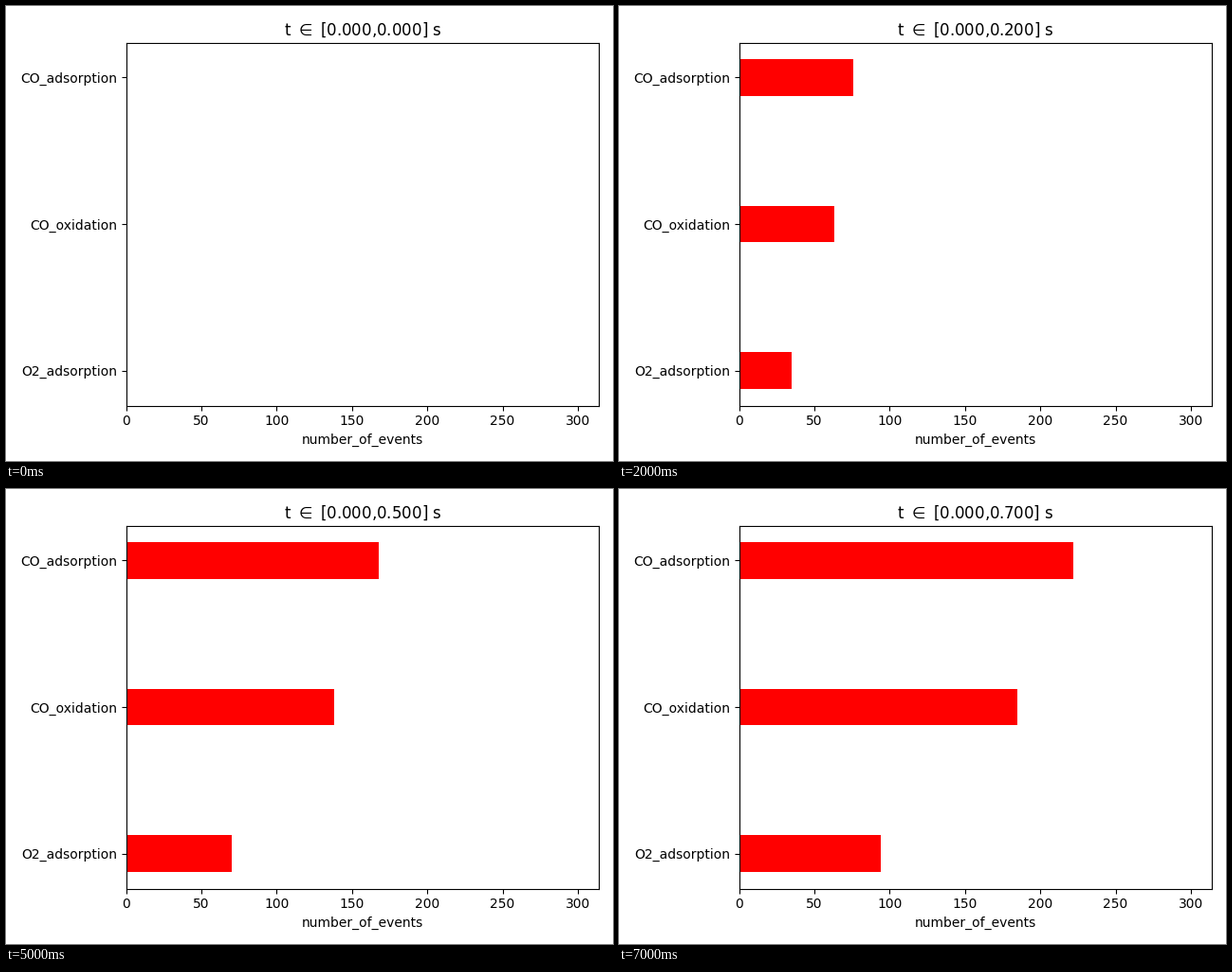
A matplotlib script for the animation above (8000 ms loop, 640 by 480 pixels).

```python
import matplotlib.pyplot as plt
import numpy as np
from matplotlib.animation import FuncAnimation

STEPS = 8
DARK_STEP = 1
MAX_COUNT = 299

# Event totals at a few key steps; they grow linearly in between
KEY_STEPS = [0, 1, 4, 6, 7]
TOTALS = {
    "O2_adsorption": [0, 23, 58, 81, 94],
    "CO_oxidation": [0, 35, 118, 157, 185],
    "CO_adsorption": [0, 40, 147, 188, 222],
}


def count(name, step):
    return round(float(np.interp(step, KEY_STEPS, TOTALS[name])))


def set_title(step):
    ax.set_title(rf"t $\in$ [0.000,{step / 10:.3f}] s")


def update(step):
    dark = step == DARK_STEP
    back = "#212121" if dark else "white"
    fig.set_facecolor(back)
    ax.set_facecolor(back)
    for name, bar in zip(TOTALS, bars):
        bar.set_width(count(name, step))
        bar.set_facecolor("#111111" if dark else "red")
    set_title(step)
    return list(bars)


fig, ax = plt.subplots(figsize=(6.4, 4.8), dpi=100)
bars = ax.barh(list(TOTALS), [0] * len(TOTALS), height=0.25)
ax.set_xlim(0, 1.05 * MAX_COUNT)
ax.set_ylim(-0.2375, 2.2375)
ax.set_xlabel("number_of_events")
set_title(0)
fig.tight_layout()

anim = FuncAnimation(fig, update, frames=STEPS, interval=1000,
                     init_func=lambda: update(0), repeat=True, repeat_delay=0)
plt.show()
```
